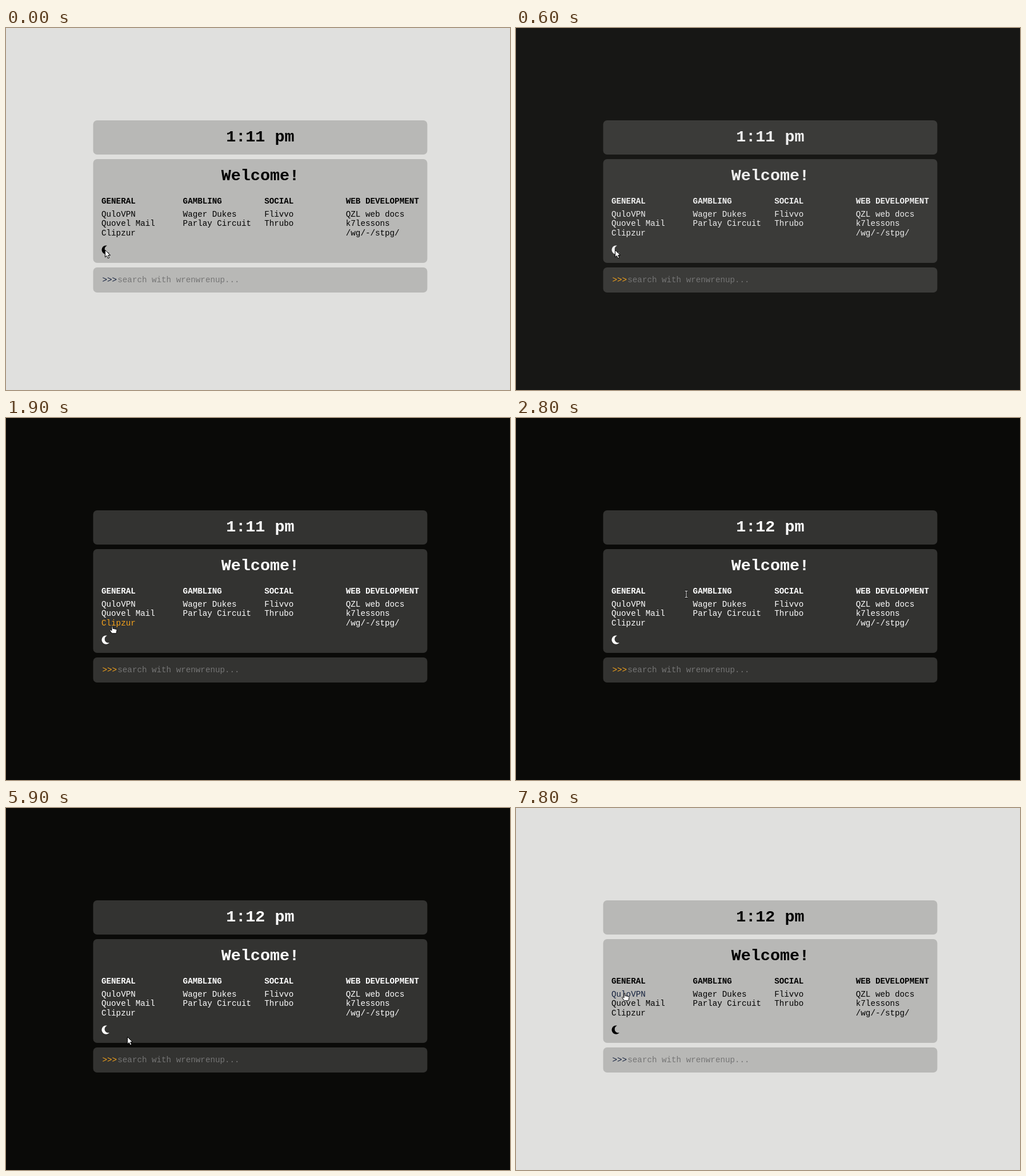
Animation, 882 px wide and 635 px high, one loop 8 s. Source, as an HTML page:

```html
<!DOCTYPE html>
<html lang="en">
<head>
<meta charset="utf-8">
<title>Start page</title>
<style>
html, body { margin: 0; width: 100%; height: 100%; overflow: hidden; background: var(--bg); }
svg { display: block; width: 882px; height: 635px; }
text { font: 14.222px "Liberation Mono", monospace; fill: var(--text); white-space: pre; }
.big { font-size: 28.444px; text-anchor: middle; }
.big, .head { font-weight: bold; }
.panel { fill: var(--panel); }
.moon { fill: var(--text); }
.accent { fill: var(--accent); }
.hint { fill: #757575; }
.pointer { fill: #fff; stroke: #000; stroke-linejoin: round; }
</style>
</head>
<body>
<svg viewBox="0 0 882 635">
  <rect class="panel" x="152.5" y="162" width="584.8" height="60" rx="7"/>
  <rect class="panel" x="152.5" y="230" width="584.8" height="182" rx="7"/>
  <rect class="panel" x="152.5" y="420" width="584.8" height="44" rx="7"/>
  <text id="clock" class="big" x="444.9" y="199"></text>
  <text class="big" x="444.9" y="267">Welcome!</text>
  <g id="columns"></g>
  <path class="moon" d="M177 381.8A7.6 7.6 0 1 0 181 394A6.3 6.3 0 0 1 177 381.8z"/>
  <text class="accent" x="168.5" y="446">&gt;&gt;&gt;</text>
  <text class="hint" x="195.3" y="446">search with wrenwrenup...</text>
  <g id="cursor">
    <path id="arrow" class="pointer" d="M.5 .5V13L3.4 10.4L5.4 15L7.7 14L5.7 9.6H9.6z"/>
    <path id="hand" class="pointer" d="M-1 .5Q0-.8 1 .5V4.3L7 5.5Q8.2 6 8 7.5L7 12.8H-.7L-4.3 7.8Q-4.2 6-2.7 6.8L-1 8z"/>
    <g id="beam" fill="none">
      <path d="M-3-5.5H3M0-5.5V5.5M-3 5.5H3" stroke="#000" stroke-width="2.6"/>
      <path d="M-2.5-5.5H2.5M0-5.5V5.5M-2.5 5.5H2.5" stroke="#fff"/>
    </g>
  </g>
</svg>
<script>
const $ = id => document.getElementById(id);
const LOOP = 8000, CHAR = 8.534, LEFT = 167, COL = 142.6, TOP = 318.5, ROW = 16.35;
const TO_DARK = 450, TO_LIGHT = 6600, FADE = 200, MINUTE = 2100;

const columns = [
  ["GENERAL", "QuloVPN", "Quovel Mail", "Clipzur"],
  ["GAMBLING", "Wager Dukes", "Parlay Circuit"],
  ["SOCIAL", "Flivvo", "Thrubo"],
  ["WEB DEVELOPMENT", "QZL web docs", "k7lessons", "/wg/-/stpg/"]
];

// pointer way points: time, x, y
const path = [
  [0, 173, 389], [1700, 174, 388], [2400, 217, 309], [2800, 298, 309],
  [3000, 394, 328], [3400, 411, 361], [3600, 455, 358], [3900, 476, 327],
  [4600, 619, 325], [4900, 628, 355], [5400, 420, 400], [5900, 212, 401],
  [6300, 180, 390], [7200, 178, 390], [7800, 190, 325], [LOOP, 190, 325]
];

const mix = (a, b, k) => a + (b - a) * k;
const grey = (light, dark, k) => `rgb(${light.map((v, i) => Math.round(mix(v, dark[i], k)))})`;
const inside = (x, y, l, t, w, h) => x >= l && x < l + w && y >= t && y < t + h;
const easeOut = k => 1 - (1 - Math.min(1, Math.max(0, k))) ** 2;

function addText(x, y, label, cls) {
  const el = document.createElementNS("http://www.w3.org/2000/svg", "text");
  el.setAttribute("x", x);
  el.setAttribute("y", Math.round(y));
  el.setAttribute("class", cls);
  el.textContent = label;
  $("columns").append(el);
  return el;
}

const links = columns.flatMap(([head, ...items], c) => {
  const x = LEFT + c * COL;
  addText(x, 308, head, "head");
  return items.map((label, r) => {
    const el = addText(x, 331 + r * ROW, label, "");
    return { el, x, y: TOP + r * ROW, w: label.length * CHAR };
  });
});

function pointerAt(t) {
  const i = path.findIndex(p => p[0] > t);
  const [a, b] = [path[i - 1], path[i]];
  const k = (t - a[0]) / (b[0] - a[0]);
  return [mix(a[1], b[1], k), mix(a[2], b[2], k)];
}

function paint(t) {
  const dark = easeOut((t - TO_DARK) / FADE) - easeOut((t - TO_LIGHT) / FADE);
  const night = t > TO_DARK && t <= TO_LIGHT;
  const css = document.documentElement.style;
  css.setProperty("--bg", grey([224, 224, 222], [10, 10, 8], dark));
  css.setProperty("--panel", grey([184, 184, 182], [51, 51, 49], dark));
  css.setProperty("--text", grey([0, 0, 0], [255, 255, 255], dark));
  css.setProperty("--accent", night ? "#f4a21c" : "#14213d");
}

function movePointer(t) {
  const [x, y] = pointerAt(t);
  let kind = "arrow";
  if (inside(x, y, LEFT, 295, 556, 18)) kind = "beam";
  if (t > TO_DARK + FADE && inside(x, y, LEFT, 381, 14, 16)) kind = "hand";
  for (const link of links) {
    const over = inside(x, y, link.x, link.y, link.w, ROW);
    link.el.setAttribute("class", over ? "accent" : "");
    if (over) kind = "hand";
  }
  for (const id of ["arrow", "hand", "beam"]) $(id).style.display = id === kind ? "" : "none";
  $("cursor").setAttribute("transform", `translate(${Math.round(x)} ${Math.round(y)})`);
}

const start = performance.now();
function tick() {
  const t = Math.floor((performance.now() - start) % LOOP / 100) * 100;
  paint(t);
  movePointer(t);
  $("clock").textContent = t < MINUTE ? "1:11 pm" : "1:12 pm";
  requestAnimationFrame(tick);
}
tick();
</script>
</body>
</html>
```
